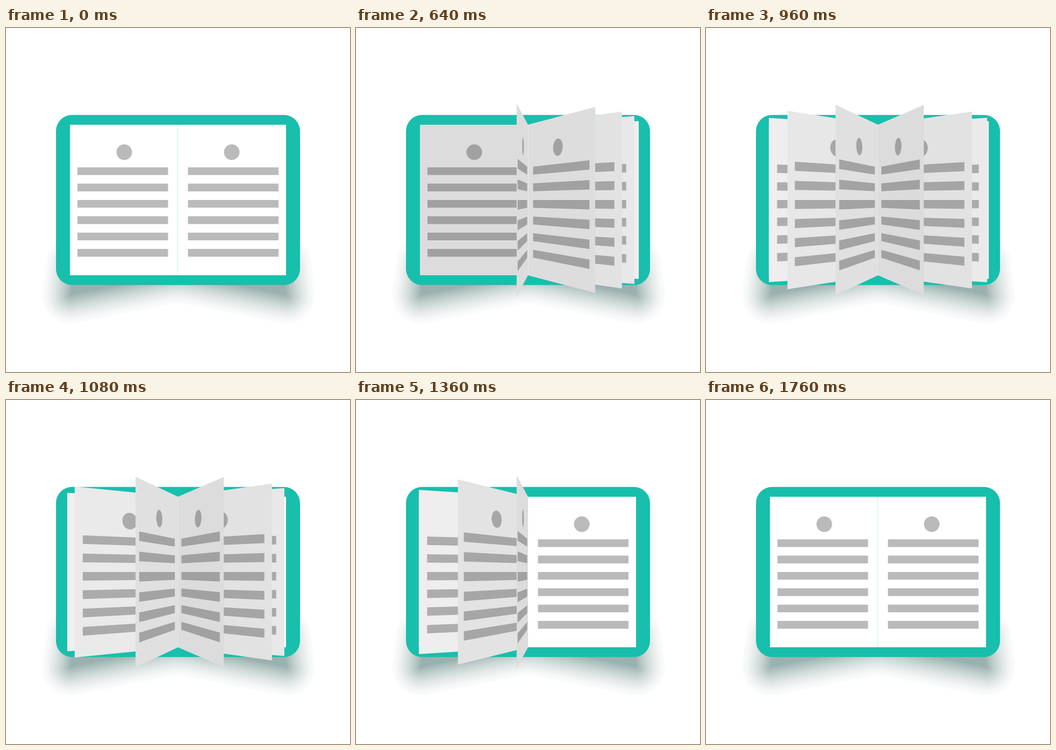
These frames come from a looping animation (640 px wide and 640 px high, 2000 ms). An HTML page with a canvas:

```html
<!DOCTYPE html>
<html lang="en">
<head>
<meta charset="utf-8">
<title>Page-turning book</title>
<style>
  html, body { margin: 0; width: 100%; height: 100%; overflow: hidden; background: #fff; }
  canvas { display: block; width: 640px; height: 640px; }
</style>
</head>
<body>
<canvas id="stage" width="640" height="640"></canvas>
<script>
const ctx = document.getElementById('stage').getContext('2d');

const LOOP = 2000, STEP = 40;
const SPINE = 320, MID = 320;
const PAGE_W = 201, PAGE_H = 280;
const DEPTH = 910; // perspective distance

// Step at which each leaf starts to lift
const STARTS = [0, 3, 5, 7, 10, 13, 16, 18];
// Angle of a leaf at each step of its turn
const TURN = [0, 0.4, 1.4, 3.1, 5.5, 8.3, 12, 17, 22.5, 28.1, 34.8, 42.2, 50.7, 59.8,
  70.4, 82.2, 94.7, 108.1, 121.8, 135, 147.4, 157.7, 167.1, 173, 176.8, 179.2, 180];
const LAST = TURN.length - 1;

const clamp = n => Math.max(0, Math.min(LAST, n));

// Shadow strength: darkens on the way up, fades on the way down
const shadeAt = n => Math.min(0.137, 0.0102 * n, 0.0137 * (LAST - n));

const grey = (value, shade) => {
  const v = Math.round(value * (1 - shade));
  return `rgb(${v},${v},${v})`;
};

// Point on a leaf (u from the spine, y on the stage) in perspective
function project(u, y, angle) {
  const scale = DEPTH / (DEPTH - u * Math.sin(angle));
  return [SPINE + u * Math.cos(angle) * scale, MID + (y - MID) * scale];
}

function fillShape(points, angle, color) {
  ctx.beginPath();
  for (const [u, y] of points) ctx.lineTo(...project(u, y, angle));
  ctx.closePath();
  ctx.fillStyle = color;
  ctx.fill();
}

const box = (u, y, w, h) => [[u, y], [u + w, y], [u + w, y + h], [u, y + h]];

const DOT = Array.from({ length: 48 }, (_, i) => {
  const a = i / 48 * 2 * Math.PI;
  return [100 + 14.5 * Math.cos(a), 231 + 14.5 * Math.sin(a)];
});

function drawLeaf(degrees, shade, inner) {
  const angle = degrees * Math.PI / 180;
  const ink = grey(186, shade);
  fillShape(box(inner, MID - PAGE_H / 2, PAGE_W - inner, PAGE_H), angle, grey(255, shade));
  fillShape(DOT, angle, ink);
  for (let i = 0; i < 6; i++) fillShape(box(18.5, 259.2 + 30.36 * i, 168.5, 14.4), angle, ink);
}

// Soft shadow in nested bands, flared at both lower corners
function drawShadow() {
  const reach = 53, bands = 18;
  ctx.beginPath();
  ctx.moveTo(127, 440);
  ctx.lineTo(120, 497);
  ctx.lineTo(290, 463);
  ctx.quadraticCurveTo(320, 456, 350, 463);
  ctx.lineTo(522, 497);
  ctx.lineTo(515, 440);
  ctx.closePath();
  ctx.lineJoin = 'round';
  for (let i = 0; i < bands; i++) {
    const k = i / (bands - 1);
    const strength = 0.025 + 0.5 * Math.pow(k, 1.4);
    const mix = [64, 106, 102].map(c => Math.round(255 + (c - 255) * strength));
    ctx.fillStyle = ctx.strokeStyle = `rgb(${mix})`;
    ctx.lineWidth = Math.max(0.5, 2 * reach * (1 - k));
    ctx.stroke();
    ctx.fill();
  }
}

function drawCover() {
  ctx.beginPath();
  ctx.roundRect(93, 161.7, 454, 316.6, 30);
  ctx.fillStyle = '#18bfac';
  ctx.fill();
}

function draw(time) {
  const step = Math.floor((time % LOOP) / STEP);
  const leaves = STARTS.map(start => {
    const n = clamp(step - start);
    return { angle: TURN[n], shade: shadeAt(n) };
  });

  ctx.fillStyle = '#fff';
  ctx.fillRect(0, 0, 640, 640);
  drawShadow();
  drawCover();

  drawLeaf(0, 0, -0.5);
  drawLeaf(180, leaves[0].shade, 0.5);

  const paint = leaf => drawLeaf(leaf.angle, leaf.shade, 1);
  leaves.filter(l => l.angle > 0 && l.angle < 90).reverse().forEach(paint);
  leaves.filter(l => l.angle >= 90).forEach(paint);
}

let begin;
function tick(now) {
  begin ??= now;
  draw(now - begin);
  requestAnimationFrame(tick);
}
draw(0);
requestAnimationFrame(tick);
</script>
</body>
</html>
```
